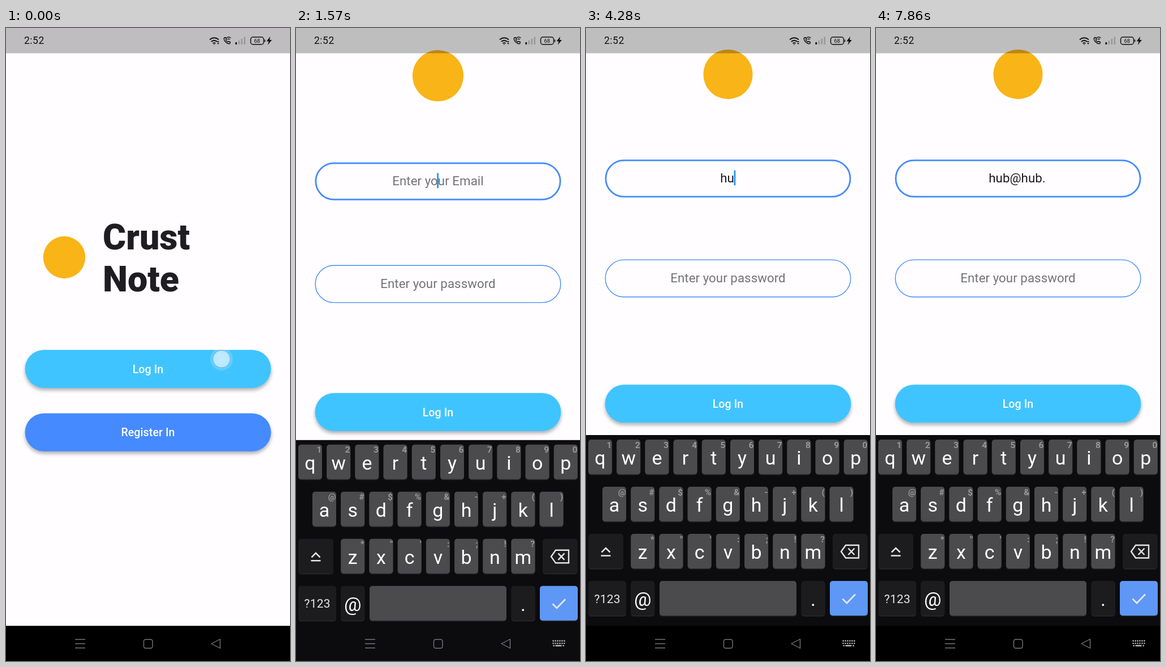
Write an HTML page that moves like this. It is 502 px wide and 1115 px high and loops after 8000 ms.

```html
<!DOCTYPE html>
<html lang="en">
<head>
<meta charset="utf-8">
<title>Login screen</title>
<style>
  html, body { margin: 0; width: 100%; height: 100%; overflow: hidden; background: #fffdff; }
  svg { display: block; width: 100vw; height: 100vh; font-family: Roboto, "Noto Sans", sans-serif; }
  .mid { text-anchor: middle; }
  .label { font-size: 19.5px; font-weight: 500; letter-spacing: .12px; fill: #fff; text-anchor: middle; }
  .input { font-size: 22.3px; letter-spacing: .04px; text-anchor: middle; }
  .hint { fill: #737275; }
  .typed { fill: #1d1b20; }
  .title { font-size: 62.7px; font-weight: 900; fill: #1f1d22; }
  .key { font-size: 34px; fill: #fff; text-anchor: middle; }
  .alt { font-size: 15.5px; font-weight: 700; fill: #98979a; text-anchor: end; }
  .line { fill: none; stroke-linejoin: round; }
  .box { fill: none; stroke: #448aff; }
</style>
</head>
<body>
<svg id="stage" viewBox="0 0 502 1115" preserveAspectRatio="none">
  <defs>
    <filter id="shadow" x="-10%" y="-30%" width="120%" height="180%">
      <feDropShadow dx="0" dy="4" stdDeviation="3.2" flood-color="#000" flood-opacity=".31"/>
    </filter>
    <radialGradient id="glow">
      <stop offset="0" stop-color="#fff" stop-opacity=".68"/>
      <stop offset=".7" stop-color="#fff" stop-opacity=".62"/>
      <stop offset=".76" stop-color="#fff" stop-opacity=".28"/>
      <stop offset="1" stop-color="#fff" stop-opacity="0"/>
    </radialGradient>
  </defs>
  <rect width="502" height="1115" fill="#fffdff"/>

  <g id="welcome">
    <text class="title" x="171" y="390">Crust</text>
    <text class="title" x="171" y="464">Note</text>
    <g transform="translate(0 600.5)">
      <rect x="33.5" y="-33.5" width="435" height="67" rx="33.5" fill="#40c4ff" filter="url(#shadow)"/>
      <text class="label" x="251" y="7">Log In</text>
    </g>
    <g transform="translate(0 712.3)">
      <rect x="33.5" y="-33.5" width="435" height="67" rx="33.5" fill="#448aff" filter="url(#shadow)"/>
      <text class="label" x="251" y="7">Register In</text>
    </g>
  </g>

  <g id="login">
    <g id="email">
      <rect id="emailBox" class="box"/>
      <text id="emailHint" class="input hint" x="251" y="6.6">Enter your Email</text>
      <text id="emailText" class="input typed" x="249.5" y="6.6"></text>
      <rect id="cursor" y="-14.5" width="2.8" height="26.5" fill="#2196f3"/>
    </g>
    <g id="password">
      <rect id="passwordBox" class="box"/>
      <text class="input hint" x="251" y="6.6">Enter your password</text>
    </g>
    <g id="submit">
      <rect x="33.5" y="-33.5" width="435" height="67" rx="33.5" fill="#40c4ff" filter="url(#shadow)"/>
      <text class="label" x="251" y="7">Log In</text>
    </g>
  </g>

  <circle id="hero" fill="#f9b417"/>

  <g id="statusBar">
    <rect width="502" height="44.5" fill="#000" fill-opacity=".25"/>
    <text x="32" y="28.3" font-size="17.5" letter-spacing=".5" fill="#111">2:52</text>
    <g class="line" stroke="#111" stroke-width="1.9">
      <path d="M360 20.5q8-6.5 16 0M362.8 24q5.2-4 10.4 0M365.5 27q2.5-1.8 5 0"/>
      <path d="M386 17q-2 3 2 7.5q4 4 7.5 3l1-2.5-3-1.5-2 1q-2-1.5-3-3.5l1.3-1.5-1.5-2.7z" stroke-width="1.5"/>
      <path d="M389.5 17.5q4-3 8 0M391.5 20q2-1.5 4.2 0" stroke-width="1.4"/>
      <rect x="432.5" y="16" width="23" height="13" rx="4" stroke-width="1.5"/>
      <path d="M457.5 20.5v4" stroke-width="1.6"/>
    </g>
    <path d="M373 25l2-2.5 2 2.5zM373 26.5l2 2.5 2-2.5zM366.5 28.5h3l-1.5 1.5z" fill="#111"/>
    <rect x="405.5" y="25" width="2.6" height="4" fill="#111"/>
    <path d="M410.5 22h2.6v7h-2.6zM415.5 19h2.6v10h-2.6zM420.5 15.5h2.6v13.5h-2.6z" fill="#999899"/>
    <text class="mid" x="443.8" y="26" font-size="9.5" fill="#111">68</text>
    <path d="M467 15l-6.5 8.5h4l-2 6.5 7.5-9h-4z" fill="#111"/>
  </g>

  <g id="keyboard"><rect width="502" height="420" fill="#0c0b0e"/></g>
  <rect id="navBar" y="1053" width="502" height="62"/>
  <g class="line" stroke="#77767a" stroke-width="1.4">
    <path d="M122 1077h18M122 1084.5h18M122 1092h18"/>
    <rect x="243.5" y="1077" width="15.5" height="15.5" rx="3.5"/>
    <path d="M378.5 1076.5v16l-15.5-8z"/>
  </g>
  <g id="switcher" stroke="#b9b8bb" stroke-width="2.3">
    <path d="M453.5 1079.5h22M453.5 1083.8h22" stroke-dasharray="2.3 1.64"/>
    <path d="M454.5 1088h2.3M458.5 1088h11M471.5 1088h2.3"/>
  </g>

  <g id="touch">
    <circle r="21.5" fill="url(#glow)"/>
    <circle r="15.5" fill="none" stroke="#4f9fd6" stroke-opacity=".65" stroke-width="1.5"/>
  </g>
</svg>
<script>
const LOOP = 8000, BODY_BOTTOM = 1053, KEYS_TOP = 717;
const SVG = 'http://www.w3.org/2000/svg';
const el = Object.fromEntries([...document.querySelectorAll('[id]')].map(n => [n.id, n]));

const clamp = v => Math.min(1, Math.max(0, v));
const span = (t, start, length) => clamp((t - start) / length);
const mix = (a, b, p) => a + (b - a) * p;
const easeOut = p => 1 - (1 - p) ** 3;
const easeInOut = p => p * p * (3 - 2 * p);

function set(node, attrs) {
  for (const name in attrs) node.setAttribute(name, attrs[name]);
}
function add(parent, tag, attrs, text = '') {
  const node = document.createElementNS(SVG, tag);
  set(node, attrs);
  node.textContent = text;
  return parent.appendChild(node);
}
const shift = (node, x, y) => set(node, { transform: `translate(${x} ${y})` });

// The outline grows inward from a fixed outer edge
function outline(node, stroke) {
  const width = 435 - stroke, height = 66.8 - stroke;
  set(node, {
    x: 251 - width / 2, y: -height / 2, width, height,
    rx: height / 2, 'stroke-width': stroke
  });
}

// Keyboard, drawn with its top edge at zero
const rowTop = row => 8 + 83 * row;
const keyPos = {};

function keyShape(x, row, width, fill) {
  const y = rowTop(row);
  add(el.keyboard, 'rect', { x, y: y + 1.5, width, height: 61, rx: 5, fill: '#29282b' });
  add(el.keyboard, 'rect', { x, y, width, height: 61, rx: 5, fill });
}
function letterKey(char, alt, x, row, fill = '#4b4a4d') {
  keyShape(x - 21, row, 42, fill);
  add(el.keyboard, 'text', { class: 'key', x, y: rowTop(row) + 44 }, char);
  add(el.keyboard, 'text', { class: 'alt', x: x + 20.5, y: rowTop(row) + 14.5 }, alt);
  keyPos[char] = [x + 3, KEYS_TOP + rowTop(row) + 34];
}
function icon(d, width = 2.6) {
  add(el.keyboard, 'path', { d, fill: 'none', stroke: '#e6e5e8', 'stroke-width': width });
}

[['qwertyuiop', '1234567890', 25], ['asdfghjkl', '@#$%&-+()', 50], ['zxcvbnm', '*"\':;!?', 100.3]]
  .forEach(([chars, alts, x], row) =>
    [...chars].forEach((c, i) => letterKey(c, alts[i], x + 50.2 * i, row)));

const DARK = '#1c1b1e';
keyShape(4, 2, 62, DARK);
keyShape(436, 2, 61.5, DARK);
keyShape(4, 3, 67, DARK);
keyShape(130, 3, 242, '#4b4a4d');
keyShape(431, 3, 67, '#5e97f6');
letterKey('@', '', 100.3, 3, DARK);
letterKey('.', '', 401.6, 3, DARK);
add(el.keyboard, 'text',
  { class: 'mid', x: 37.7, y: 295.5, 'font-size': 21, 'letter-spacing': .3, fill: '#e6e5e8' }, '?123');
icon('M27.5 206.5l7.5-7.5 7.5 7.5M26.5 212.5h17');
icon('M459 194h23v22.5h-23l-8-11.25zM463.5 199.5l11 11.5M474.5 199.5l-11 11.5', 2.4);
icon('M453.5 288.5l7.5 7.5 15-15.5', 2.8);

const typing = [[3700, 'h'], [4130, 'u'], [4560, 'b'], [5420, '@'],
                [5920, 'h'], [6140, 'u'], [6350, 'b'], [7350, '.']];
const touches = [
  { from: -200, to: 140, at: [381, 583] },
  { from: 1120, to: 1240, at: [330, 380] },
  ...typing.map(([time, c]) => ({
    from: time - (c === '@' ? 270 : 130), to: time - (c === '@' ? 90 : 20), at: keyPos[c]
  }))
];

function drawTouch(t) {
  const active = touches.find(({ from, to }) => t >= from && t < to + 120);
  el.touch.style.opacity = active
    ? Math.min(span(t, active.from, 60), 1 - span(t, active.to, 120)) : 0;
  if (active) shift(el.touch, ...active.at);
}

function drawEmail(t) {
  const done = typing.filter(([time]) => t >= time);
  const value = done.map(([, c]) => c).join('');
  const focused = t >= 1270;
  const blinkStart = done.length ? done[done.length - 1][0] : 1138;
  const blinkOn = Math.floor((t - blinkStart) / 500) % 2 === 0;
  if (el.emailText.textContent !== value) el.emailText.textContent = value;
  const width = value ? el.emailText.getComputedTextLength() : 0;
  el.emailHint.style.opacity = value ? 0 : 1;
  el.cursor.style.opacity = focused && blinkOn ? 1 : 0;
  set(el.cursor, { x: 249.2 + width / 2 });
  outline(el.emailBox, focused ? 2.8 : 1.4);
}

function draw(t) {
  const page = easeInOut(span(t, 150, 260));
  el.welcome.style.opacity = 1 - page;
  el.login.style.opacity = page;

  // The form shrinks by `lift` as the keyboard comes up slightly ahead of it
  const lift = (BODY_BOTTOM - KEYS_TOP) * easeOut(span(t, 1290, 434));
  const keysTop = mix(BODY_BOTTOM, KEYS_TOP, easeOut(span(t, 1266, 434)));
  shift(el.email, 0, 377.2 - lift / 3);
  shift(el.password, 0, 665.1 - lift * 2 / 3);
  shift(el.submit, 0, 997.8 - lift);
  shift(el.keyboard, 0, keysTop);

  const heroSize = mix(124, 250 - lift * .311, page);
  set(el.hero, {
    cx: mix(103, 251, page),
    cy: mix(404, 139 - lift * .171, page),
    r: heroSize * .3
  });

  const keysShown = t >= 1266;
  set(el.navBar, { fill: keysShown && t < 4280 ? '#0c0b0e' : '#000' });
  el.keyboard.style.opacity = keysShown ? 1 : 0;
  el.switcher.style.opacity = keysShown ? 1 : 0;

  drawEmail(t);
  drawTouch(t);
}

outline(el.passwordBox, 1.4);
const start = performance.now();
function tick() {
  draw((performance.now() - start) % LOOP);
  requestAnimationFrame(tick);
}
tick();
</script>
</body>
</html>
```
